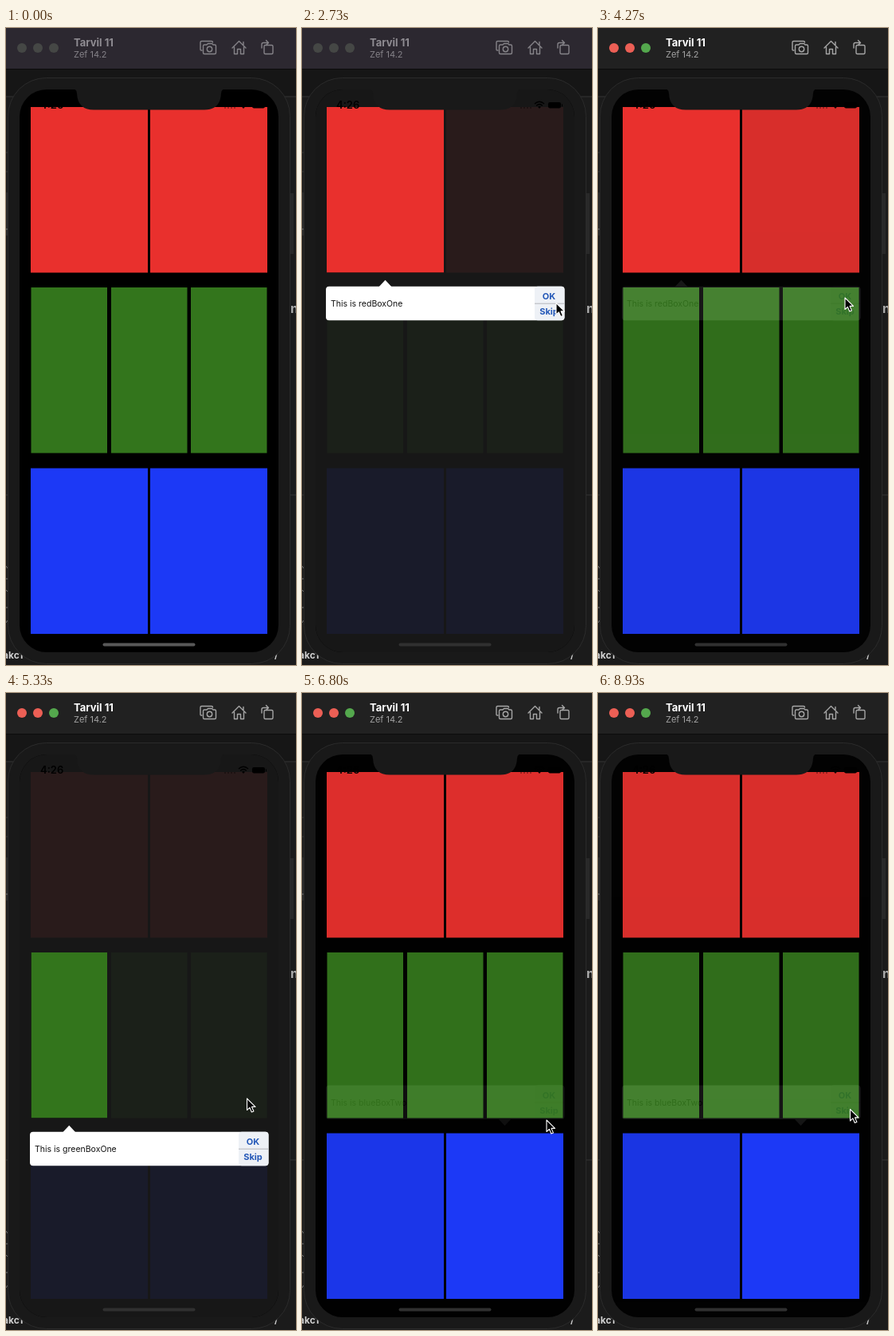
Recreate the animation shown at these times as an HTML page. Size 364 by 798 pixels, loop 8.99 s.

```html
<!DOCTYPE html>
<html lang="en">
<head>
<meta charset="utf-8">
<title>Guided tour</title>
<style>
  html, body { margin: 0; width: 100%; height: 100%; overflow: hidden; background: #1b1b1b; }
  svg { display: block; width: 364px; height: 798px; font-family: Inter, Roboto, sans-serif; }
  .title-bar { --bar: #2c2830; --title: #8f8c92; --sub: #858288; --icon: #858388;
               --close: #454745; --mini: #454745; --zoom: #454745; }
  .title-bar.active { --bar: #212121; --title: #fff; --sub: #a2a2a2; --icon: #a6a6a6;
                      --close: #ec5f55; --mini: #ec5f55; --zoom: #54a84d; }
  .icons { fill: none; stroke: var(--icon); stroke-width: 1.4; stroke-linejoin: round; stroke-linecap: round; }
  .button { font-size: 11px; font-weight: 700; fill: #2458b8; text-anchor: middle; }
</style>
</head>
<body>
<svg viewBox="0 0 364 798">
  <defs>
    <clipPath id="screen"><rect x="17" y="77" width="325" height="705" rx="34"/></clipPath>
  </defs>

  <!-- Desktop behind the simulator -->
  <rect width="364" height="798" fill="#1b1b1b"/>
  <rect y="52" width="364" height="34" fill="#161616"/>
  <path d="M0 86H364M0 156H4M0 180H4M0 585H4M357 585H364" stroke="#353535"/>
  <path d="M0 206H4V260H0ZM356 207H361V283H356Z" fill="#292929"/>
  <path d="M0 252H2M0 674L3 678M0 690H2M0 704L3 707M0 726H2M0 745L3 741" stroke="#777"/>
  <g font-weight="700" fill="#d0d0d0">
    <text x="357" y="357" font-size="16" fill="#aaa">n</text>
    <text x="-4" y="790" font-size="12">akc1</text>
    <text x="337" y="790" font-size="11">/</text>
  </g>

  <g class="title-bar" id="titleBar">
    <rect width="364" height="51" style="fill:var(--bar)"/>
    <path d="M0 51.5H364" stroke="#0c0c0c"/>
    <circle cx="20" cy="25" r="6" style="fill:var(--close)"/>
    <circle cx="40" cy="25" r="6" style="fill:var(--mini)"/>
    <circle cx="60" cy="25" r="6" style="fill:var(--zoom)"/>
    <text x="85" y="23" font-size="13" font-weight="700" style="fill:var(--title)">Tarvil 11</text>
    <text x="85" y="37" font-size="11" style="fill:var(--sub)">Zef 14.2</text>
    <g class="icons">
      <path d="M246 28H245Q244 28 244 27V18Q244 16.500 245.500 16.500H258Q259.500 16.500 259.500 18"/>
      <path d="M249 21H252L253.500 19.500H258.500L260 21H262Q263.500 21 263.500 22.500V31Q263.500 32.500 262 32.500H249Q247.500 32.500 247.500 31V22.500Q247.500 21 249 21Z"/>
      <circle cx="255.500" cy="26.500" r="3.200"/>
      <path d="M284 25L292.500 16.500L301 25M286.500 24V32.500H290.500V26.500H294.500V32.500H298.500V24M298 17.500V21"/>
      <rect x="324" y="21.500" width="11" height="11" rx="1.500"/>
      <path d="M321 25V20.500Q321 18.500 323 18.500H329M326.500 15.500L329.500 18.500L326.500 21.500"/>
    </g>
  </g>

  <!-- Phone -->
  <rect x="2.500" y="62.500" width="354" height="734" rx="48" fill="#191919" stroke="#2b2b2b"/>
  <g clip-path="url(#screen)">
    <rect x="17" y="77" width="325" height="705" fill="#000"/>
    <g id="boxes"></g>
    <g id="guide">
      <path id="dimmer" fill="#1a1a1a" fill-opacity=".92" fill-rule="evenodd"/>
      <g id="tip">
        <path id="arrow" fill="#fff"/>
        <rect x="30" width="299.500" height="42.500" rx="4" fill="#fff"/>
        <rect x="292" width="37.500" height="42.500" rx="4" fill="#eef1f6"/>
        <path d="M292 21.500H329.500" stroke="#b4b6ba"/>
        <text id="message" x="36" y="25.500" font-size="10.500" fill="#111"></text>
        <text class="button" x="310" y="16">OK</text>
        <text class="button" x="310" y="35">Skip</text>
      </g>
    </g>
    <g>
      <text x="43" y="101" font-size="13" font-weight="600">4:26</text>
      <path d="M292 95Q298 89.500 304 95M294.200 97.300Q298 94 301.800 97.300" fill="none" stroke="#000" stroke-width="1.600"/>
      <path d="M296 98.800Q298 97 300 98.800L298 101Z"/>
      <rect x="309" y="93" width="16" height="7.500" rx="2.200"/>
      <path d="M326.500 95.500V98.500" stroke="#000"/>
      <path d="M274 100H288" stroke="#000" stroke-width="1.500" stroke-dasharray="2 2" opacity=".4"/>
    </g>
    <path d="M84 76Q89 77 89 82Q90 102.500 110 102.500H249Q269 102.500 270 82Q270 77 275 76Z" fill="#191919"/>
    <rect id="homeBar" x="121.500" y="770.500" width="116" height="4" rx="2"/>
  </g>

  <path id="cursor" d="M0 0V14.500L3.400 11.400L5.800 17L8.400 15.900L6 10.400H10.500Z"
        fill="#000" stroke="#fff" stroke-width="1.100" stroke-linejoin="round"/>
</svg>

<script>
const LOOP = 8990, FPS = 15, ACTIVATED = 4000;
const byId = id => document.getElementById(id);
const set = (el, attrs) => { for (const k in attrs) el.setAttribute(k, attrs[k]); };
const mix = (a, b, p) => a + (b - a) * p;
const ease = (t, from, to) => {
  const p = Math.min(1, Math.max(0, (t - from) / (to - from)));
  return p * p * (3 - 2 * p);
};

const BOX_H = 207.5;
const rows = [
  { y: 99, w: 147, xs: [31, 181], color: '#e9302d' },
  { y: 325, w: 95.5, xs: [31.5, 132, 232], color: '#33751c' },
  { y: 551.5, w: 147, xs: [31, 181], color: '#1c39f6' },
];

// Each step spotlights one box: fade-in and fade-out intervals in ms.
const steps = [
  { row: 0, col: 0, text: 'This is redBoxOne', show: [500, 930], hide: [4075, 4310] },
  { row: 1, col: 0, text: 'This is greenBoxOne', show: [4720, 5140], hide: [6135, 6375] },
  { row: 2, col: 1, text: 'This is blueBoxTwo', above: true, show: [6740, 7140], hide: [8740, 8975] },
];

// Cursor path: time, x, y
const cursorPath = [
  [1265, -12, 470], [2200, 309, 347], [2730, 319, 344.5], [2870, 319, 344.5],
  [3400, 310, 338], [4300, 310, 338], [5330, 302.5, 508], [5800, 304.5, 557.5],
  [6330, 304.5, 557.5], [6730, 307, 535], [7200, 307, 535], [7600, 316.5, 521.5],
];

for (const { y, w, xs, color } of rows) {
  for (const x of xs) {
    const rect = document.createElementNS('http://www.w3.org/2000/svg', 'rect');
    set(rect, { x, y, width: w, height: BOX_H, fill: color });
    byId('boxes').append(rect);
  }
}

function drawGuide(t) {
  const step = steps.find(s => t < s.hide[1]) || steps[2];
  const { y, w, xs } = rows[step.row];
  const x = xs[step.col], mid = x + w / 2;
  set(byId('guide'), { opacity: ease(t, ...step.show) * (1 - ease(t, ...step.hide)) });
  set(byId('dimmer'), { d: `M17 77H342V782H17ZM${x} ${y}h${w}v${BOX_H}h${-w}Z` });
  set(byId('tip'), { transform: `translate(0 ${step.above ? y - 60 : y + 224.7})` });
  set(byId('arrow'), { d: step.above
    ? `M${mid - 8} 42L${mid} 50.500L${mid + 8} 42Z`
    : `M${mid - 8} .5L${mid} -8L${mid + 8} .5Z` });
  byId('message').textContent = step.text;
}

function drawCursor(t) {
  const next = cursorPath.findIndex(p => p[0] > t);
  const [t1, x1, y1] = cursorPath.at(next);
  const [t0, x0, y0] = next > 0 ? cursorPath[next - 1] : [t1 - 1, x1, y1];
  const p = ease(t, t0, t1);
  set(byId('cursor'), {
    transform: `translate(${mix(x0, x1, p)} ${mix(y0, y1, p)})`,
    visibility: next === 0 ? 'hidden' : 'visible',
  });
}

function draw(now) {
  const frame = Math.floor(((now % LOOP) + 5) * FPS / 1000);
  const t = frame * 1000 / FPS;
  byId('titleBar').classList.toggle('active', t >= ACTIVATED);
  const grey = Math.round(mix(88, 48, ease(t, 500, 930)));
  set(byId('homeBar'), { fill: `rgb(${grey},${grey},${grey})` });
  drawGuide(t);
  drawCursor(t);
}

const start = performance.now();
function tick() {
  draw(performance.now() - start);
  requestAnimationFrame(tick);
}
tick();
</script>
</body>
</html>
```
